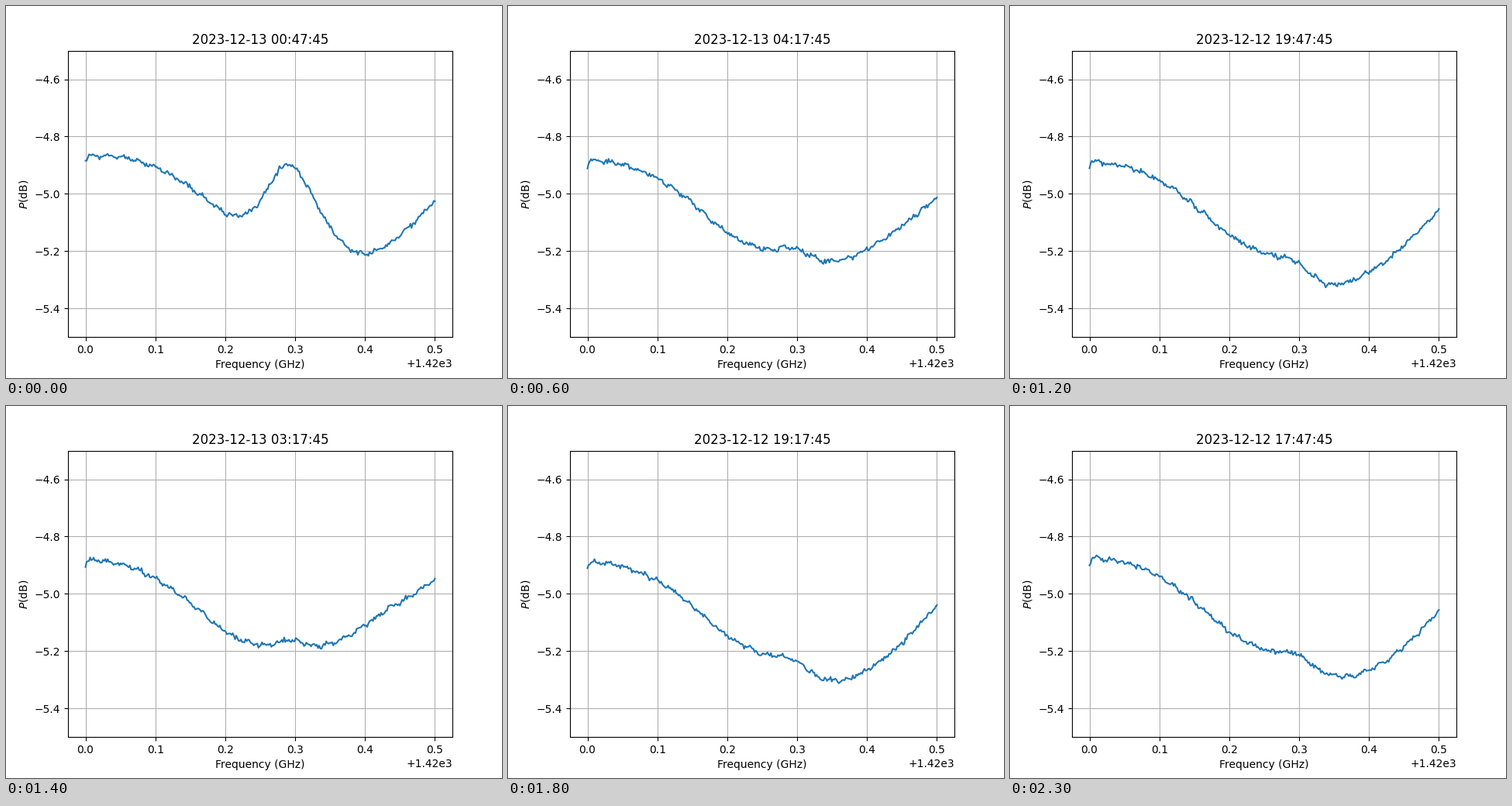
Write a matplotlib script that moves like this. It is 640x480 px and loops after 2.4 s.

```python
import numpy as np
import matplotlib.pyplot as plt
from matplotlib.animation import FuncAnimation

FREQ = np.linspace(0, 0.5, 300)
START = 17 * 60 + 17  # first sweep, minutes after midnight
STEP = 30             # minutes between sweeps

# Sweeps play out of order; the first one is held twice as long
ORDER = [15, 15, 18, 9, 7, 12, 22, 3, 16, 11, 14, 0,
         5, 10, 20, 8, 6, 19, 4, 13, 21, 2, 17, 1]


def bell(x, centre, width):
    return np.exp(-((x - centre) / width) ** 2 / 2)


def passband(x):
    """Receiver response in mdB above -5 dB."""
    rise = np.clip((x - 0.365) / 0.135, 0, None) ** 1.5
    return (-82 + 206 * np.cos(np.pi * x / 0.367) + 111 * rise
            + 7 * bell(x, 0.09, 0.04)
            - 20 * bell(x, 0.2, 0.03)
            + 42 * bell(x, 0.295, 0.022)
            - 18 * np.exp(-x / 0.002))


def emission(x, sweep):
    """Spectral line that strengthens, broadens and drifts upwards."""
    drift = np.clip((sweep - 7) / 13, 0, 1) ** 2.4
    centre = 0.235 + 0.185 * drift
    width = np.where(x < centre, 0.031 + 0.05 * drift ** 3,
                     0.029 + 0.06 * drift)
    return 272 * bell(sweep, 16.5, 3.55) * bell(x, centre, width)


def background(x, sweep):
    """Slow changes of level and slope over the night."""
    early, late = bell(sweep, 4, 0.9), bell(sweep, 15, 2)
    level = (8 * bell(sweep, 8, 1) - 16 * bell(sweep, 4.3, 1.2)
             - 8 * bell(sweep, 21, 2))
    return (level + 65 * late * bell(x, 0.24, 0.12)
            - 42 * bell(sweep, 6.5, 1.5) * bell(x, 0.33, 0.035)
            + (35 * early + 28 * late) * bell(x, 0.5, 0.08))


def spectrum(sweep):
    ripple = 4 * np.cos(2 * np.pi * (FREQ - 0.122) / 0.0225)
    noise = np.random.default_rng(100 + sweep).normal(0, 4, FREQ.size)
    total = (passband(FREQ) + emission(FREQ, sweep)
             + background(FREQ, sweep) + ripple + noise)
    return -5 + total / 1000


def timestamp(sweep):
    days, minutes = divmod(START + STEP * sweep, 24 * 60)
    return f"2023-12-{12 + days} {minutes // 60:02d}:{minutes % 60:02d}:45"


fig, ax = plt.subplots(figsize=(6.4, 4.8), dpi=100)
line, = ax.plot(1420 + FREQ, spectrum(ORDER[0]))
title = ax.set_title(timestamp(ORDER[0]))
ax.set_ylim(-5.5, -4.5)
ax.set_xlabel("Frequency (GHz)")
ax.set_ylabel("$P$(dB)")
ax.grid()


def update(frame):
    sweep = ORDER[frame]
    line.set_ydata(spectrum(sweep))
    title.set_text(timestamp(sweep))
    return line, title


anim = FuncAnimation(fig, update, frames=len(ORDER), interval=100,
                     repeat=True, repeat_delay=0, blit=False)
plt.show()
```
